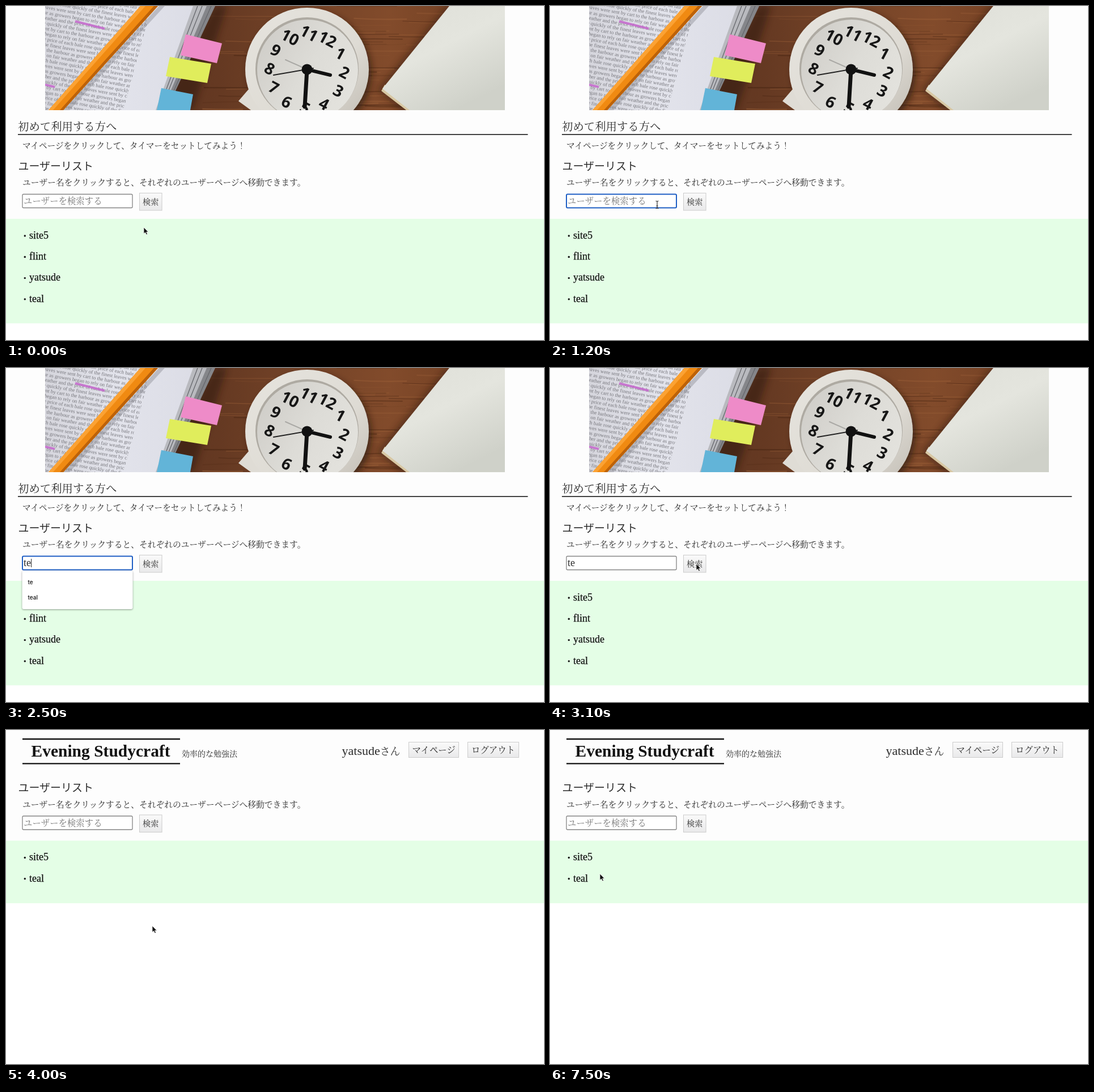
An HTML page that plays this animation: 949x590 px, repeating every 7600 ms.

```html
<!DOCTYPE html>
<html lang="ja">
<head>
<meta charset="utf-8">
<title>User search</title>
<style>
  html, body { margin: 0; width: 100%; height: 100%; overflow: hidden; background: #fff; }
  svg { display: block; width: 949px; height: 590px; }
  text { font-family: "Liberation Serif", "Noto Serif CJK JP", "Noto Sans CJK JP", "Noto Sans CJK", serif; fill: #2b2b2b; white-space: pre; }
  .jp { font-weight: 500; }
  .sans { font-family: "Noto Sans CJK JP", "Noto Sans CJK", sans-serif; font-weight: 350; }
  .item { font-size: 18px; fill: #111; stroke: #111; stroke-width: .25px; }
  .hint { fill: #757575; }
  .menu text { font: 500 10px Inter, "Noto Sans CJK JP", "Noto Sans CJK", sans-serif; fill: #111; }
  .dial text { font: 700 28px "Open Sans", sans-serif; fill: #161616; text-anchor: middle; }
  .print text { font-size: 9px; fill: #77777d; }
  .menu rect { filter: drop-shadow(0 1px 1.5px rgba(0, 0, 0, .4)); }
</style>
</head>
<body>
<svg viewBox="0 0 949 590">
  <defs>
    <linearGradient id="face" x1="0" y1="0" x2="0" y2="1">
      <stop offset="0" stop-color="#fafafa"/><stop offset="1" stop-color="#e9e9ea"/>
    </linearGradient>
    <linearGradient id="wood">
      <stop offset="0" stop-color="#55301e"/><stop offset=".38" stop-color="#653922"/>
      <stop offset=".5" stop-color="#6f4026"/><stop offset=".75" stop-color="#824b2b"/>
      <stop offset="1" stop-color="#6d3c20"/>
    </linearGradient>
    <linearGradient id="cover" x1="0" y1="0" x2=".6" y2="1">
      <stop offset="0" stop-color="#dedfd8"/><stop offset=".5" stop-color="#e4e5de"/>
      <stop offset="1" stop-color="#cfd1c9"/>
    </linearGradient>
    <linearGradient id="rim" x1="0" y1="0" x2="1" y2="1">
      <stop offset="0" stop-color="#e6e4de"/><stop offset=".6" stop-color="#dedbd4"/>
      <stop offset="1" stop-color="#bfbab1"/>
    </linearGradient>
    <linearGradient id="plate" x1="0" y1=".2" x2="1" y2=".8">
      <stop offset="0" stop-color="#cfcdc8"/><stop offset=".5" stop-color="#dddcd7"/>
      <stop offset="1" stop-color="#e4e3de"/>
    </linearGradient>
    <linearGradient id="paper">
      <stop offset="0" stop-color="#d5d5dc"/><stop offset=".5" stop-color="#e2e3eb"/>
      <stop offset="1" stop-color="#dcdde6"/>
    </linearGradient>
    <filter id="soft" x="-20%" y="-20%" width="140%" height="140%"><feGaussianBlur stdDeviation="6"/></filter>
    <clipPath id="frame"><path d="M69 0H880V184H69Z"/></clipPath>
    <clipPath id="column"><path d="M69 0H257L207 184H69Z"/></clipPath>
  </defs>

  <rect id="top" width="949" height="376" fill="#fdfdfd"/>

  <g id="home">
    <g clip-path="url(#frame)">
      <path d="M69 0H880V184H69Z" fill="url(#wood)"/>
      <g id="grain" fill="none"/>
      <path d="M366 0H390L330 184H270Z" fill="#2a160c" opacity=".5" filter="url(#soft)"/>
      <path d="M776 0L654 148L700 190H880V0Z" fill="#2a160c" opacity=".4" filter="url(#soft)"/>
      <circle cx="536" cy="118" r="109" fill="#241208" opacity=".6" filter="url(#soft)"/>

      <path d="M69 0H369L283 184H69Z" fill="#85868a"/>
      <path d="M69 0H354L276 184H69Z" fill="#b9babf"/>
      <path d="M69 0H330L264 184H69Z" fill="url(#paper)"/>
      <path d="M338 0L269 184M346 0L273 184M362 0L281 184" stroke="#66676c" stroke-width="1.3"/>
      <g clip-path="url(#column)"><g class="print" id="print"/></g>
      <path d="M122 27L174 40M69 139L86 143" stroke="#c567cd" stroke-width="4" opacity=".85"/>
      <path d="M270 0L280 0L112 184H100Z" fill="#77777f" opacity=".35"/>
      <path d="M237 0H268L101 184H75Z" fill="#f08a12"/>
      <path d="M237 0H246L83 184H75Z" fill="#fba233"/>
      <path d="M261 0H268L101 184H95Z" fill="#bd6208"/>
      <path d="M317 50L381 66L372 101L308 87Z" fill="#ee8bc8"/>
      <path d="M289 90L362 102L355 136L282 124Z" fill="#e0ed5c"/>
      <path d="M274 145L330 156L325 184H266Z" fill="#62b4d8"/>

      <path d="M410 168L428 147L460 184H432Z" fill="#dfdcd5"/>
      <circle cx="531" cy="112" r="109" fill="url(#rim)"/>
      <circle cx="531" cy="111" r="91" fill="#aeaaa2"/>
      <circle cx="532" cy="113" r="89" fill="url(#plate)"/>
      <g class="dial" id="dial"/>
      <g stroke-linecap="round">
        <path d="M531 112L493 95" stroke="#aaa9a5" stroke-width="2"/>
        <path d="M542 110L472 122" stroke="#222" stroke-width="2"/>
        <path d="M531 112L572 122" stroke="#111" stroke-width="6"/>
        <path d="M531 112L527 178" stroke="#111" stroke-width="7"/>
      </g>
      <circle cx="531" cy="112" r="9.5" fill="#111"/>

      <path d="M662 150L668 139L716 184H706Z" fill="#d8c8a4"/>
      <path d="M782 0H880V184H712L664 146Z" fill="url(#cover)"/>
    </g>
    <text class="jp" x="21" y="220" font-size="19.4">初めて利用する方へ</text>
    <path d="M21 227H920.5" stroke="#444" stroke-width="2"/>
    <text class="jp" x="29" y="251.7" font-size="14.65">マイページをクリックして、タイマーをセットしてみよう！</text>
  </g>

  <g id="header">
    <path d="M29 16H307M29 59.4H307" stroke="#111" stroke-width="2.4"/>
    <text x="44.5" y="47" font-size="29.5" font-weight="700" style="fill:#111">Evening Studycraft</text>
    <text class="jp" x="310" y="47" font-size="14">効率的な勉強法</text>
    <text class="jp" x="592.5" y="43.5" font-size="22">yatsude<tspan font-size="17.8">さん</tspan></text>
    <rect x="710.5" y="21.5" width="88" height="27" fill="url(#face)" stroke="#ccc"/>
    <text class="jp" x="716.5" y="40.8" font-size="15.4">マイページ</text>
    <rect x="814.5" y="21.5" width="90" height="27" fill="url(#face)" stroke="#ccc"/>
    <text class="jp" x="821" y="40.8" font-size="15.4">ログアウト</text>
  </g>

  <g id="users">
    <text class="sans" x="21.5" y="289.5" font-size="19">ユーザーリスト</text>
    <text class="jp" x="29" y="317" font-size="14.75">ユーザー名をクリックすると、それぞれのユーザーページへ移動できます。</text>
    <rect id="field" x="29" y="332.5" width="194" height="24" rx="2" fill="#fff"/>
    <text id="query" x="31" y="350"></text>
    <path id="caret" d="M44.7 337V352" stroke="#222"/>
    <rect x="235.5" y="330.5" width="39.5" height="30.5" fill="url(#face)" stroke="#ccc"/>
    <text class="jp" x="241" y="350.5" font-size="14.2">検索</text>
    <rect id="panel" y="376" width="949" fill="#e4fee6"/>
    <g id="list"/>
  </g>

  <g class="menu" id="menu">
    <rect x="28.5" y="358" width="195" rx="3" fill="#fff"/>
    <g id="options"/>
  </g>

  <path id="arrow" d="M0 0V11.2L2.6 8.9L4.6 13L6.5 12.1L4.6 8.2H8Z" fill="#111" stroke="#fff" stroke-width=".7"/>
  <path id="beam" d="M-2.5 -6.5Q0 -6.5 0 -5Q0 -6.5 2.5 -6.5M0 -5V5M-2.5 6.5Q0 6.5 0 5Q0 6.5 2.5 6.5M-1.5 2H1.5" fill="none" stroke="#222" stroke-width="1.1"/>
</svg>
<script>
const LOOP = 7600, STEP = 100, SCROLL = -180.5;
const $ = id => document.getElementById(id);
const show = (id, on) => $(id).setAttribute('display', on ? 'inline' : 'none');

function add(parent, tag, attrs, text = '') {
  const el = document.createElementNS('http://www.w3.org/2000/svg', tag);
  for (const key in attrs) el.setAttribute(key, attrs[key]);
  el.textContent = text;
  parent.append(el);
  return el;
}

function drawGrain() {
  let seed = 11;
  const rnd = () => (seed = seed * 16807 % 2147483647) / 2147483647;
  for (let i = 0; i < 80; i++) {
    const x = 340 + rnd() * 480, y = rnd() * 184, len = 40 + rnd() * 130, bend = rnd() * 6 - 3;
    add($('grain'), 'path', {
      d: `M${x} ${y}q${len / 2} ${bend} ${len} ${bend / 2}`,
      stroke: rnd() < .6 ? '#41210f' : '#a5683c',
      'stroke-width': .6 + rnd() * 2, opacity: .15 + rnd() * .3
    });
  }
}

function drawPrint() {
  const words = 'of the finest leaves were sent by cart to the harbour as growers began to rely on fair weather and the price of each bale rose quickly ';
  for (let i = 0; i < 25; i++) {
    const from = i * 37 % words.length;
    add($('print'), 'text', { transform: `translate(62 ${i * 9.4 - 34}) rotate(10)` },
      (words + words).slice(from, from + 56));
  }
}

function drawDial() {
  for (let n = 1; n <= 12; n++) {
    const a = (n * 30 + 33) * Math.PI / 180;
    const x = 531 + 66 * Math.sin(a), y = 114 - 66 * Math.cos(a);
    add($('dial'), 'text', { transform: `translate(${x} ${y}) rotate(28)`, y: 10 }, n);
  }
}

// [time, typed text, focused, suggestions]
const FIELD = [
  [0, '', false, []],
  [1200, '', true, []],
  [1300, '', true, ['t', 'cloud', 'ya', 'te', 'f', '霧']],
  [2100, 't', true, ['t', 'te', 'teal']],
  [2300, 'te', true, ['te', 'teal']],
  [3100, 'te', false, []],
  [3800, '', false, []]
];
const RESULT_AT = 3800;
const USERS = ['site5', 'flint', 'yatsude', 'teal'];

// [time, x, y] of the pointer tip
const POINTER = [
  [0, 243, 391], [200, 243, 391], [700, 206, 369], [1100, 189, 351],
  [2700, 189, 351], [3100, 258, 346], [4100, 258, 346], [4700, 298, 308],
  [6400, 298, 308], [7200, 131, 256], [7500, 88, 254]
];
const TYPING = [2100, 2700];

function pointerAt(t) {
  const i = Math.max(1, POINTER.findIndex(p => p[0] >= t));
  const [t0, x0, y0] = POINTER[i - 1], [t1, x1, y1] = POINTER[i];
  const k = (t - t0) / (t1 - t0), e = k * k * (3 - 2 * k);
  return [x0 + (x1 - x0) * e, y0 + (y1 - y0) * e];
}

function drawUsers(found) {
  const names = found ? USERS.filter(n => n.includes('te')) : USERS;
  $('list').replaceChildren();
  names.forEach((name, i) => {
    const y = 405.5 + i * 37.3;
    add($('list'), 'circle', { cx: 33.3, cy: y + .5, r: 1.7, fill: '#111' });
    add($('list'), 'text', { class: 'item', x: 41, y: y + 5.2 }, name);
  });
  $('panel').setAttribute('height', found ? 110.5 : 184.5);
  $('top').setAttribute('height', found ? 196 : 376);
  $('users').setAttribute('transform', `translate(0 ${found ? SCROLL : 0})`);
  show('home', !found);
  show('header', found);
}

function drawField([, typed, focused, options]) {
  const query = $('query'), field = $('field');
  query.textContent = typed || 'ユーザーを検索する';
  query.setAttribute('class', typed ? '' : 'jp hint');
  query.setAttribute('font-size', typed ? 18 : 15.4);
  field.setAttribute('stroke', focused ? '#1f5fc4' : '#858585');
  field.setAttribute('stroke-width', focused ? 2 : 1.3);
  show('caret', focused && typed);
  $('caret').setAttribute('transform', `translate(${typed === 't' ? -8 : 0} 0)`);
  show('menu', options.length);
  $('menu').querySelector('rect').setAttribute('height', options.length * 28 + 12);
  $('options').replaceChildren();
  options.forEach((o, i) => add($('options'), 'text', { x: 38.5, y: 381.5 + i * 27.9 }, o));
}

function drawPointer(t) {
  const [x, y] = pointerAt(t);
  const over = t < RESULT_AT && x > 29 && x < 223 && y > 332 && y < 357;
  const hidden = t >= TYPING[0] && t < TYPING[1];
  for (const id of ['arrow', 'beam']) $(id).setAttribute('transform', `translate(${x} ${y})`);
  show('arrow', !hidden && !over);
  show('beam', !hidden && over);
}

let last = -1;
function tick() {
  const t = Math.floor(performance.now() % LOOP / STEP) * STEP;
  if (t !== last) {
    last = t;
    drawUsers(t >= RESULT_AT);
    drawField(FIELD.findLast(f => f[0] <= t));
    drawPointer(t);
  }
  requestAnimationFrame(tick);
}

drawGrain();
drawPrint();
drawDial();
tick();
</script>
</body>
</html>
```
